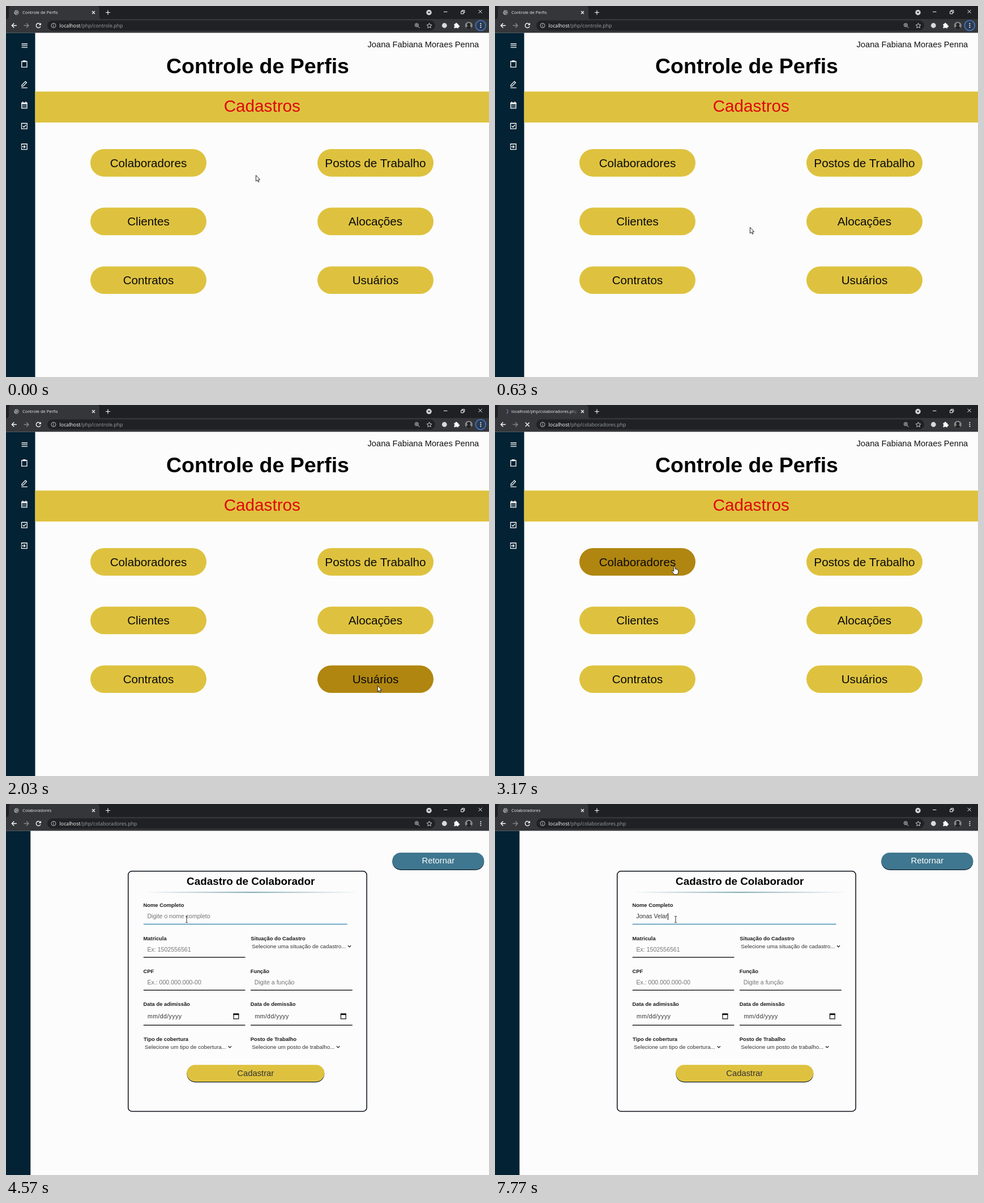
Animation, 853 px wide and 656 px high, one loop 8 s. Source, as an HTML page:

```html
<!DOCTYPE html>
<html lang="pt">
<head>
<meta charset="utf-8">
<title>Controle de Perfis</title>
<style>
html, body { margin: 0; width: 100%; height: 100%; overflow: hidden; background: #fcfcfc; }
svg { display: block; width: 853px; height: 656px; }
text { font-family: "Liberation Sans", Arial, sans-serif; white-space: pre; }
.ui { font-family: "Open Sans", "Noto Sans", sans-serif; }
.line { fill: none; stroke: #fff; stroke-width: 1.3; }
</style>
</head>
<body>
<svg id="stage" viewBox="0 0 853 656"></svg>
<script>
const LOOP = 8000, CLICK = 3070, LOADED = 3230, FOCUS = 4040;
const GOLD = '#dec23f', DARK_GOLD = '#b08610', NAVY = '#032233';
const stage = document.getElementById('stage');

const rect = (x, y, w, h, fill, r = 0, more = '') =>
  `<rect x="${x}" y="${y}" width="${w}" height="${h}" rx="${r}" fill="${fill}" ${more}/>`;
const circle = (x, y, r, fill, more = '') =>
  `<circle cx="${x}" cy="${y}" r="${r}" fill="${fill}" ${more}/>`;
const text = (x, y, size, str, fill = '#000', more = '') =>
  `<text x="${x}" y="${y}" font-size="${size}" fill="${fill}" ${more}>${str}</text>`;
const line = (d, more = '') => `<path class="line" d="${d}" ${more}/>`;
const group = (id, body, more = '') => `<g id="${id}" ${more}>${body}</g>`;
const MID = 'text-anchor="middle"', BOLD = 'font-weight="700"', UI = 'class="ui"';

const globe = circle(18.5, 11.5, 4.3, '#9aa0a6') +
  line('M15 9.5l2.5 2 1 2.8M18 7.8l1.2 2 2.8.4M20 15l.6-2.4 1.8-.4', 'style="stroke:#35363a;stroke-width:1"');

function chrome() {
  const tools = line('M18.8 34.5H10.5M14.3 30.5l-4 4 4 4') +
    line('M31.5 34.5h8.3M36 30.5l4 4-4 4', 'style="stroke:#85878b"') +
    group('reload', line('M60.8 32.6A4 4 0 1 0 61 36') + '<path d="M62 29.8v4.2h-4.2z" fill="#fff"/>') +
    group('stop', line('M53.7 31l7 7M60.7 31l-7 7'));
  const omni = rect(73, 25.5, 685, 18, '#202124', 9) +
    circle(84, 34.5, 4, 'none', 'stroke="#bdc1c6"') +
    rect(83.5, 33.8, 1, 3, '#bdc1c6') + rect(83.5, 31.8, 1, 1.1, '#bdc1c6') +
    `<text class="ui" x="94.6" y="37.7" font-size="8.8" fill="#fff">localhost<tspan id="path" fill="#9aa0a6"></tspan></text>` +
    circle(725.3, 33.7, 3, 'none', 'stroke="#d0d3d6"') +
    line('M727.5 36l3 3M723.8 33.7h3M725.3 32.2v3', 'style="stroke:#d0d3d6;stroke-width:1"') +
    line('M747.5 30.3l1.3 2.8 3.1.4-2.3 2.1.6 3.1-2.7-1.5-2.7 1.5.6-3.1-2.3-2.1 3.1-.4z', 'style="stroke:#d0d3d6;stroke-width:1"');
  const extras = circle(774.3, 34.5, 4.4, '#d9dadc') +
    '<path d="M791.5 31.8h2.2a1.6 1.6 0 1 1 3 0h2.3v2.5a1.6 1.6 0 1 1 0 3v2h-2.6a1.5 1.5 0 0 0-2.8 0h-2.1v-2.3a1.6 1.6 0 0 0 0-2.8z" fill="#fff"/>' +
    circle(817.3, 34.5, 6.6, '#85878a') + circle(817.3, 33, 3, '#222') +
    '<path d="M812.5 39a5 5 0 0 1 9.6 0 6.5 6.5 0 0 1-9.6 0z" fill="#222"/>' +
    group('ring', circle(838.3, 34.5, 9, '#2b3a52', 'stroke="#4279c4" stroke-width="1.6"')) +
    [31.2, 34.5, 37.8].map(y => circle(838.4, y, 1.05, '#fff')).join('');
  const frame = circle(747, 11.5, 4.7, '#d5d6d8') +
    '<path d="M744.7 10.3h4.6l-2.3 3z" fill="#202124"/>' +
    line('M773 10.3h6.4M803.6 9.4h4.4v4.4h-4.4zM805.3 9v-1.4h4.5V12h-1.4M834.6 6.8l6 6M840.6 6.8l-6 6', 'style="stroke-width:1"');
  const tab = '<path d="M0 23.500Q5 23.500 5 18V5Q5 0 10 0H160Q165 0 165 5V18Q165 23.500 170 23.500Z" fill="#35363a"/>' +
    group('globe', globe) +
    group('spin', '<path d="M20.500 7.800A4.200 4.200 0 0 1 20.500 15.200" fill="none" stroke="#6f8fbd" stroke-width="1.1"/>') +
    '<text id="tab" class="ui" x="29" y="14.300" font-size="7.500" fill="#eceded" clip-path="url(#tabclip)"></text>' +
    rect(134, 5, 12, 13, 'url(#tabfade)') +
    line('M152 9l5 5M157 9l-5 5M176 11.500h8M180 7.500v8', 'style="stroke-width:1.100"');
  return rect(0, 0, 853, 24, '#1f2023') + rect(0, 23, 853, 24.4, '#35363a') + tab + tools + omni + extras + frame;
}

const buttons = [
  ['Colaboradores', 149, 253], ['Postos de Trabalho', 550, 253],
  ['Clientes', 149, 356.6], ['Alocações', 550, 356.6],
  ['Contratos', 149, 460.4], ['Usuários', 550, 460.4]
];

function menuPage() {
  const icons = line('M27.500 67h10.500M27.500 70.200h10.500M27.500 73.400h10.500') +
    line('M27.700 98h9.300v10.200h-9.300z') + rect(29.8, 96.2, 5, 3, '#fff') +
    line('M27.200 144.700h10.600M28 142v-2.300l6.300-6.300 2.100 2.100-6.300 6.400z') +
    line('M27.700 171.300h9.300v9.600h-9.300zM29.500 169v2M35.200 169v2') + rect(27.5, 170.8, 10, 2.7, '#fff') +
    line('M29.300 175.700h6.200M29.300 178.300h6.200', 'stroke-dasharray="1.300 1.100"') +
    line('M27.500 207.500h9.700v9.700h-9.700zM29.800 212.300l1.800 1.900 3.600-3.900') +
    line('M27.500 247.200v-3.200h9.700v9.700h-9.700v-3.200M26.500 248.900h7M31.500 246.500l2.400 2.400-2.400 2.400');
  const pills = buttons.map(([name, x, y]) =>
    rect(x, y, 205, 48.7, GOLD, 24.3, 'class="pill"') + text(x + 102.5, y + 31.6, 20.7, name, '#0a0a0a', MID)).join('');
  return rect(0, 47.4, 51.5, 609, NAVY) + icons +
    text(835.3, 73, 14.7, 'Joana Fabiana Moraes Penna', '#111', 'text-anchor="end"') +
    text(444.5, 119, 37.5, 'Controle de Perfis', '#000', MID + BOLD) +
    rect(51.5, 151.3, 801.5, 54.7, GOLD) +
    text(452.3, 187.3, 29.7, 'Cadastros', '#e0060c', MID) + pills;
}

function formPage() {
  const label = (x, y, s) => text(x, y, 9.4, s, '#1c1c1c', BOLD);
  const hint = (x, y, s, more) => text(x, y, 10.6, s, '#757575', more);
  const rule = (x, y, w, more) => rect(x, y, w, 1.4, '#161616', 0, more);
  const select = (x, y, s, cx) => text(x, y, 9.8, s, '#333') +
    line(`M${cx - 2.6} ${y - 4.3}l2.600 2.600 2.600-2.600`, 'style="stroke:#222"');
  const date = x => text(x, 378.7, 10.6, 'mm/dd/yyyy', '#333', 'letter-spacing=".38"') +
    line(`M${x + 152} 371.300h8.800v8.600h-8.800z`, 'style="stroke:#111;stroke-width:1.200"') +
    rect(x + 151.5, 370.3, 9.8, 2.8, '#111');
  const pill = (x, y, w, fill, s, ink) => rect(x, y + 1, w, 30, '#10202c', 15) + rect(x, y, w, 29.7, fill, 14.8) +
    text(x + w / 2, y + 19.4, 14.8, s, ink, MID);
  return rect(0, 47.4, 43.3, 609, NAVY) +
    pill(682.3, 86, 162, '#3f7790', 'Retornar', '#fff') +
    rect(215.8, 118.8, 421.3, 424.6, '#fcfcfc', 6.5, 'stroke="#090d16" stroke-width="1.5"') +
    text(432.2, 143.4, 18.85, 'Cadastro de Colaborador', '#000', MID + BOLD) +
    rect(243, 155.2, 380, 2, 'url(#fade)') +
    label(242.5, 182, 'Nome Completo') + hint(249.4, 202, 'Digite o nome completo', 'id="hint"') +
    text(249.4, 202, 10.6, '', '#333', 'id="typed"') + rect(250, 193, 1, 12, '#111', 0, 'id="caret"') +
    rule(242.8, 211.8, 359.8, 'id="nameRule"') +
    label(242.5, 240.6, 'Matricula') + hint(249.4, 260.6, 'Ex: 1502556561') + rule(242.8, 270.4, 179.6) +
    label(432.3, 240.6, 'Situação do Cadastro') + select(434.3, 254.6, 'Selecione uma situação de cadastro...', 606.5) +
    label(242.5, 298.6, 'CPF') + hint(249.4, 318.6, 'Ex.: 000.000.000-00') + rule(242.8, 328.5, 179.6) +
    label(431.7, 298.6, 'Função') + hint(438.8, 318.6, 'Digite a função') + rule(432, 328.5, 179.8) +
    label(242.5, 356.6, 'Data de adimissão') + date(250) + rule(242.8, 390.4, 179.6) +
    label(431.7, 356.6, 'Data de demissão') + date(439.4) + rule(432, 390.4, 179.8) +
    label(243, 418.6, 'Tipo de cobertura') + select(245, 432.6, 'Selecione um tipo de cobertura...', 395.3) +
    label(431.7, 418.6, 'Posto de Trabalho') + select(434.3, 432.6, 'Selecione um posto de trabalho...', 586.6) +
    pill(319.3, 461.2, 243, GOLD, 'Cadastrar', '#333');
}

const pointers =
  group('arrow', '<path d="M.400 .300V10.900L2.800 8.700 4.400 12.300 6 11.600 4.500 8H7.600Z" fill="#fff" stroke="#111" stroke-width=".9"/>') +
  group('hand', '<path d="M-1.300 1.200Q0-.600 1.200 1.200V5.200Q2.500 4.300 3.300 5.700 4.600 5 5.200 6.400 6.600 6 6.800 7.600V10.500Q6.300 12.500 5.300 14.700H-.700Q-2 12-4.300 9.700C-5 8.200-3.200 7.300-1.300 9.300Z" fill="#fff" stroke="#111" stroke-width=".9"/>') +
  group('beam', line('M-2-5.500H-.700L0-5 .700-5.500H2M0-5V5M-2 5.500H-.700L0 5 .700 5.500H2', 'style="stroke:#333;stroke-width:1"'));

stage.innerHTML = `<defs>
  <clipPath id="tabclip">${rect(28, 0, 117.5, 23, '#fff')}</clipPath>
  <linearGradient id="tabfade"><stop stop-color="#35363a" stop-opacity="0"/><stop offset="1" stop-color="#35363a"/></linearGradient>
  <linearGradient id="fade"><stop stop-color="#7fa5b3" stop-opacity="0"/><stop offset=".5" stop-color="#7fa5b3"/><stop offset="1" stop-color="#7fa5b3" stop-opacity="0"/></linearGradient>
  </defs>` + rect(0, 0, 853, 656, '#fcfcfc') + group('menu', menuPage()) + group('form', formPage()) +
  chrome() + group('pointer', pointers);

const $ = id => document.getElementById(id);
const show = (id, on) => { $(id).style.display = on ? '' : 'none'; };
const put = (id, str) => { if ($(id).textContent !== str) $(id).textContent = str; };

// time, x, y
const route = [
  [0, 441, 299], [30, 441, 299], [630, 450, 391], [860, 462, 404], [1300, 560, 442], [1630, 640, 482],
  [2030, 656, 496], [2230, 636, 526], [2470, 520, 470], [2750, 385, 345], [2980, 317, 285],
  [3250, 317, 285], [3530, 321, 282], [3900, 321, 222], [4130, 319, 204], [LOOP, 319, 204]
];
const keyTimes = [5240, 5570, 6070, 6170, 6340, 6540, 7000, 7240, 7400, 7570, 7770];
const NAME = 'Jonas Velar';
const pills = [...document.querySelectorAll('.pill')];
const typed = $('typed');

function place(t) {
  const i = route.findIndex((p, n) => n && p[0] > t);
  const [a, b] = [route[i - 1], route[i]];
  const k = (t - a[0]) / (b[0] - a[0]);
  return [a[1] + (b[1] - a[1]) * k, a[2] + (b[2] - a[2]) * k];
}

function draw(t) {
  const form = t >= LOADED, busy = t >= CLICK && !form;
  show('menu', !form);
  show('form', form);
  show('globe', !busy);
  show('spin', busy);
  show('reload', !busy);
  show('stop', busy);
  show('ring', t < CLICK);
  $('spin').setAttribute('transform', `rotate(${(t - 3170) * 0.36} 18.5 11.5)`);
  put('path', t < CLICK ? '/php/controle.php' : '/php/colaboradores.php');
  put('tab', form ? 'Colaboradores' : busy ? 'localhost/php/colaboradores.php' : 'Controle de Perfis');

  const [x, y] = place(t);
  const inside = (bx, by, w, h) => x >= bx && x <= bx + w && y >= by && y <= by + h;
  buttons.forEach(([, bx, by], i) =>
    pills[i].setAttribute('fill', inside(bx, by, 205, 48.7) ? DARK_GOLD : GOLD));
  const link = !form && buttons.some(([name, bx, by]) => {
    const half = name.length * 5.2;
    return inside(bx + 102.5 - half, by + 12, half * 2, 23);
  });
  const beam = form && inside(243, 186, 359, 26);
  show('hand', link);
  show('beam', beam);
  show('arrow', !link && !beam);
  $('pointer').setAttribute('transform', `translate(${x} ${y})`);

  const count = keyTimes.filter(k => t >= k).length;
  const since = t - (count ? keyTimes[count - 1] : FOCUS);
  put('typed', NAME.slice(0, count));
  show('hint', !count);
  show('caret', t >= FOCUS && Math.floor(since / 530) % 2 === 0);
  $('caret').setAttribute('x', Math.round(249.5 + (count && form ? typed.getComputedTextLength() : 0)));
  $('nameRule').setAttribute('fill', t >= FOCUS ? '#3c88b4' : '#161616');
}

const start = performance.now();
function tick() {
  draw((performance.now() - start) % LOOP);
  requestAnimationFrame(tick);
}
tick();
</script>
</body>
</html>
```
